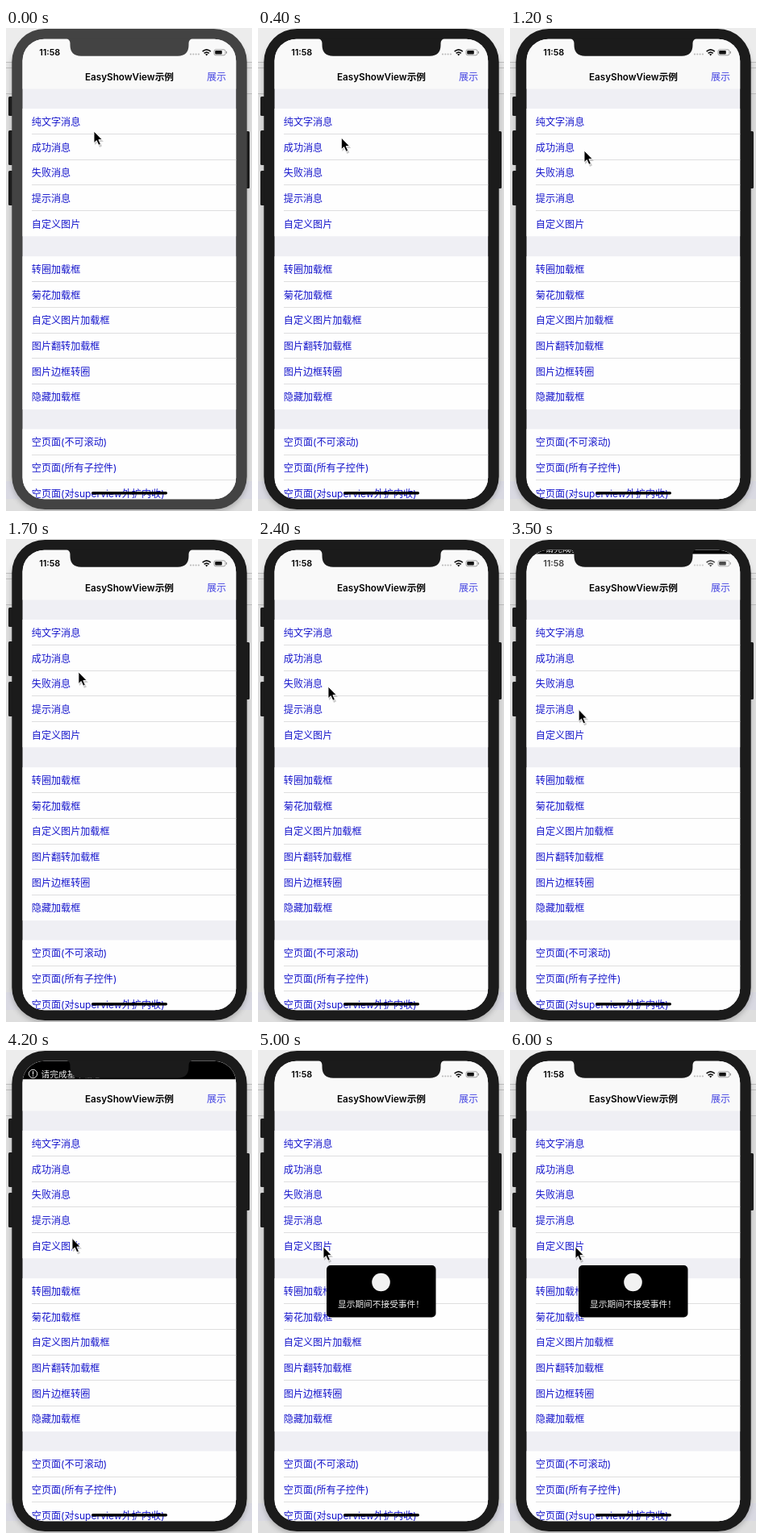
Recreate the animation shown at these times as an HTML page. Size 305 by 599 pixels, loop 6.1 s.

```html
<!DOCTYPE html>
<html lang="zh">
<head>
<meta charset="utf-8">
<style>
html, body { margin: 0; width: 100%; height: 100%; overflow: hidden; background: #dcdcdc; }
svg { display: block; width: 305px; height: 599px; }
text { font-family: Inter, "Noto Sans CJK SC", "Noto Sans CJK", sans-serif; font-size: 12.1px; }
</style>
</head>
<body>
<svg viewBox="0 0 305 599">
  <defs>
    <clipPath id="screen"><rect x="20.5" y="13.7" width="264.7" height="570.5" rx="27"/></clipPath>
    <filter id="soft" x="-20%" y="-10%" width="140%" height="120%"><feGaussianBlur stdDeviation="3"/></filter>
  </defs>

  <rect width="305" height="599" fill="#dedede"/>
  <rect width="305" height="42" fill="#ececec"/>
  <rect y="42" width="305" height="40" fill="#e4e4e4"/>
  <path d="M0 42.5H305M0 49.5H305M0 81.5H305" stroke="#bcbcbc"/>
  <rect y="562" width="305" height="22" fill="#d9d9e2"/>
  <rect x="7" y="8" width="292" height="593" rx="42" fill="#777" opacity=".45" filter="url(#soft)"/>

  <g fill="#1b1b1b">
    <rect x="3" y="85" width="6" height="24" rx="1.5"/>
    <rect x="3" y="127" width="6" height="43" rx="1.5"/>
    <rect x="3" y="177" width="6" height="43" rx="1.5"/>
    <rect x="296" y="128" width="6" height="71" rx="1.5"/>
  </g>
  <rect id="body" x="7.3" y="1" width="291.4" height="596" rx="41"/>

  <g clip-path="url(#screen)">
    <rect x="20" y="13" width="266" height="572" fill="#efeff4"/>
    <rect x="20" y="13" width="266" height="62.5" fill="#f9f9f9"/>
    <g id="list"></g>
    <text x="153" y="64.5" text-anchor="middle" font-weight="600" style="font-size:11.7px">EasyShowView示例</text>
    <text x="249" y="64.5" fill="#4545e2" style="font-size:12px">展示</text>
    <g id="status">
      <text x="41.2" y="34" font-weight="600" style="font-size:10.8px">11:58</text>
      <g fill="#bbb">
        <circle cx="229" cy="32.5" r="1.1"/><circle cx="232.3" cy="32.5" r="1.1"/>
        <circle cx="235.6" cy="32.5" r="1.1"/><circle cx="238.9" cy="32.5" r="1.1"/>
      </g>
      <path d="M243.6 29.2Q248.7 24.6 253.8 29.2M245.6 31.4Q248.7 28.7 251.8 31.4" fill="none" stroke="#111" stroke-width="1.6"/>
      <path d="M247 32.6Q248.7 31.4 250.4 32.6L248.7 34.4Z" fill="#111"/>
      <rect x="258" y="26.8" width="14" height="7" rx="2" fill="none" stroke="#888" stroke-width=".8"/>
      <rect x="259.2" y="28" width="8.6" height="4.6" rx="1" fill="#111"/>
      <path d="M273.4 29V31.6" stroke="#888"/>
    </g>
    <g id="banner">
      <rect x="20" y="13" width="266" height="23.3" fill="#000"/>
      <circle cx="33.5" cy="29.5" r="5.2" fill="none" stroke="#fff" stroke-width=".9"/>
      <path d="M33.5 26.3V30.6M33.5 31.6V32.8" stroke="#fff" stroke-width="1.1"/>
      <text x="43.6" y="33.5" fill="#eee" style="font-size:10.7px">请完成基本信息</text>
    </g>
    <rect x="106" y="575" width="94" height="3.4" rx="1.7" fill="#000"/>
    <g id="popup">
      <rect x="85" y="267" width="135.5" height="64.5" rx="5" fill="#000"/>
      <circle cx="152.5" cy="288" r="11.3" fill="#f2f2f2"/>
      <text x="99" y="319.2" fill="#eee" style="font-size:10.7px">显示期间不接受事件！</text>
    </g>
  </g>
  <path id="notch" d="M74 12.5Q79.5 14 79.5 19V21Q79.5 34.7 93 34.7H213Q226.5 34.7 226.5 21V19Q226.5 14 232 12.5Z"/>

  <g id="cursor">
    <path d="M1 2V17L4.5 14L7 20L10 18.5L7.5 13H12Z" fill="#555" opacity=".3"/>
    <path d="M0 0V14.6L3.3 11.6L5.8 17.3L8.4 16.2L5.9 10.6H10.3Z" fill="#000" stroke="#fff" stroke-width=".9" stroke-linejoin="round"/>
  </g>
</svg>
<script>
const $ = id => document.getElementById(id);
const LOOP = 6100, STEP = 100, ROW = 31.65;

const groups = [
  [100, ['纯文字消息', '成功消息', '失败消息', '提示消息', '自定义图片']],
  [283.2, ['转圈加载框', '菊花加载框', '自定义图片加载框', '图片翻转加载框', '图片边框转圈', '隐藏加载框']],
  [497.4, ['空页面(不可滚动)', '空页面(所有子控件)', '空页面(对superview外扩内收)']]
];

$('list').innerHTML = groups.map(([top, rows]) => {
  const items = rows.map((label, i) => {
    const y = top + i * ROW;
    const line = i ? `<rect x="32" y="${Math.floor(y)}" width="254" height="1" fill="#dededf"/>` : '';
    return `${line}<text x="31.8" y="${y + 20.9}" fill="#1616cc">${label}</text>`;
  }).join('');
  return `<rect x="20" y="${top}" width="266" height="${rows.length * ROW}" fill="#fefefe"/>${items}`;
}).join('');

// time, x, y of the pointer tip
const path = [
  [0, 109, 128], [1200, 92, 152], [2400, 87, 183], [3100, 87, 199],
  [4200, 82, 233.5], [5000, 81, 244], [LOOP, 81, 244]
];

const ramp = (t, from, to) => Math.min(1, Math.max(0, (t - from) / (to - from)));
const ease = u => u * u * (3 - 2 * u);

function pointer(t) {
  const i = path.findIndex(p => p[0] > t);
  const a = path[i - 1], b = path[i];
  const u = ramp(t, a[0], b[0]);
  return [a[1] + (b[1] - a[1]) * u, a[2] + (b[2] - a[2]) * u];
}

function draw(t) {
  $('cursor').setAttribute('transform', `translate(${pointer(t)})`);

  const shell = t < 300 ? '#434343' : '#1b1b1b';
  $('body').setAttribute('fill', shell);
  $('notch').setAttribute('fill', shell);

  const drop = ease(ramp(t, 3400, 3700)) - ease(ramp(t, 4400, 4700));
  $('banner').setAttribute('transform', `translate(0 ${-24 * (1 - drop)})`);
  $('status').setAttribute('opacity', 1 - drop);

  $('popup').setAttribute('opacity', ramp(t, 4600, 4900));
}

function tick() {
  const t = performance.now() % LOOP;
  draw(Math.floor(t / STEP) * STEP);
  requestAnimationFrame(tick);
}
tick();
</script>
</body>
</html>
```
